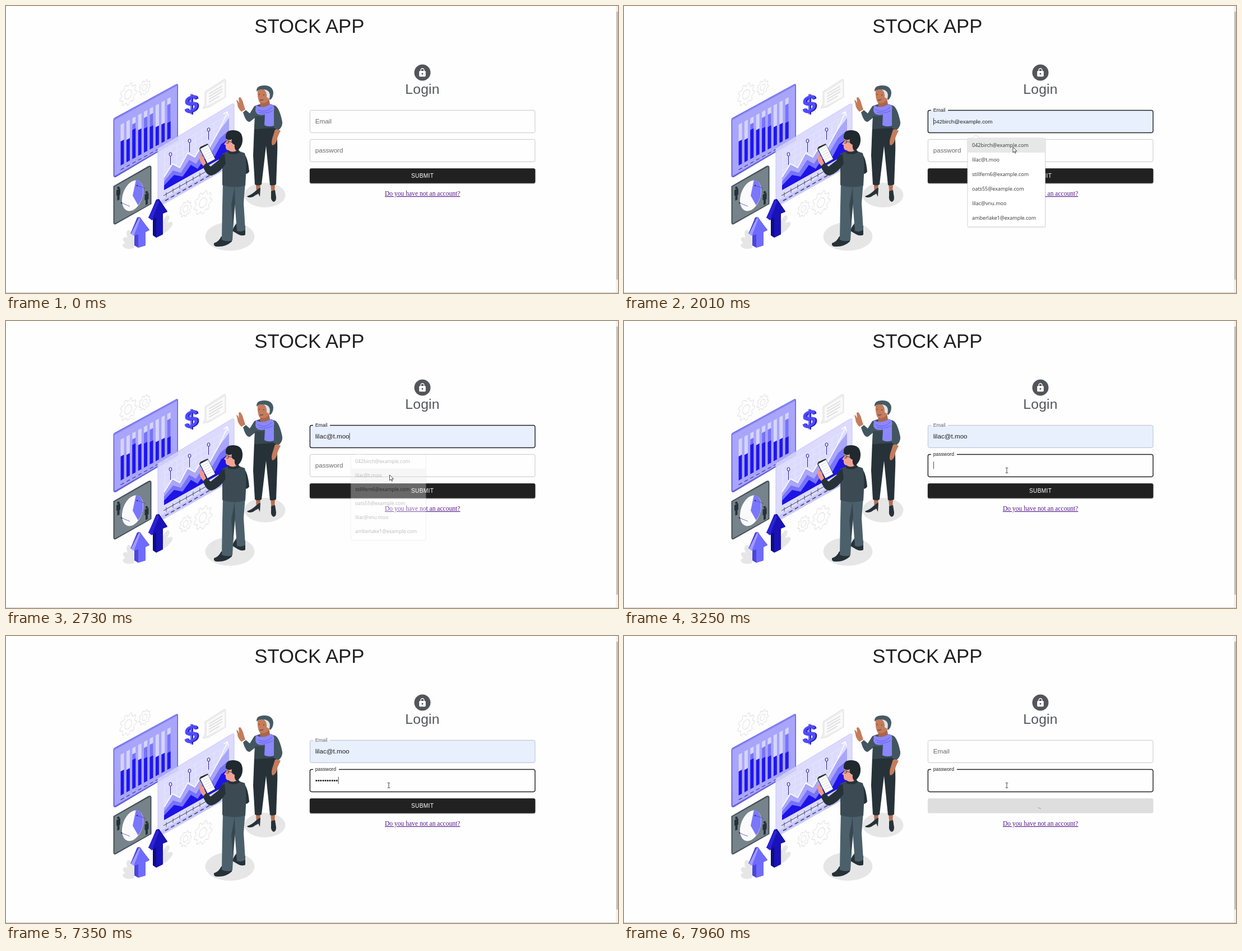
An HTML page for the animation above (8 s loop, 1092 by 513 pixels).

```html
<!DOCTYPE html>
<html lang="en">
<head>
<meta charset="utf-8">
<title>Stock App</title>
<style>
  html, body { margin: 0; height: 100%; overflow: hidden; background: #fefefe; }
  svg { display: block; width: 100vw; height: 100vh; }
  text { font-family: "Liberation Sans", Arial, sans-serif; font-size: 11.64px; fill: #212121; }
  #menu text { font-family: "Open Sans", "Noto Sans", sans-serif; font-size: 9px; fill: #333; }
  .line { fill: none; stroke: #e3e3e3; stroke-width: 1.3; }
</style>
</head>
<body>
<svg viewBox="0 0 1092 513">
  <rect width="1092" height="513" fill="#fefefe"/>
  <rect x="1088" width="4" height="513" fill="#f1f1f1"/>
  <rect x="1089" y="10" width="3" height="479" fill="#c1c1c1"/>
  <path d="M0 512.5H1092" stroke="#d8cabd"/>
  <text x="443.3" y="48" style="font-size:34.7px">STOCK APP</text>

  <g id="scenery">
    <ellipse cx="399.5" cy="412" rx="44" ry="25.5" fill="#e6e6e6"/>
    <ellipse cx="462" cy="338" rx="36.5" ry="22" fill="#e6e6e6"/>
    <g id="gears" class="line"></g>

    <!-- note -->
    <path d="M355 153L389 131Q392 130 392 133V163L362 181L351 183L355 175Z" fill="#ededed" stroke="#e3e3e3"/>
    <path d="M358 155L390 135V162L358 179Z" fill="#fafafa"/>
    <path d="M362 157L386 143M362 162L386 148M362 167L386 153M362 172L381 161" stroke="#dcdcdc" stroke-width="1.5"/>

    <!-- leaves -->
    <path d="M228 433C209 438 203 425 213 424C205 417 209 411 217 414C212 403 218 396 224 404L231 420ZM274 408C278 382 287 370 291 375C294 380 287 386 288 388C300 381 300 392 291 399C287 405 281 405 274 410Z" fill="#e6e6e6"/>

    <!-- bar chart panel -->
    <path d="M191.5 203Q192 200 195 199L303 140Q307 138 307 142V240L196 306Q192 307 191.5 303Z" fill="#6561dc"/>
    <path d="M193 203.5L305.5 142V239L193.500 304Z" fill="#a8a5fb"/>
    <path d="M192 202L304 139.5L305.5 142L193 204Z" fill="#8582f6"/>
    <g id="bars" transform="matrix(1 -.55 0 1 192 202)"></g>

    <!-- area chart panel -->
    <path d="M271 255L402 176Q407 173 407 177V283L274 358Q271 359 271 356Z" fill="#d8d6fd" fill-opacity=".88" stroke="#c5c3fc"/>
    <path d="M271 351L407 273V283L271 358Z" fill="#c6c4fc"/>
    <g id="grid" transform="matrix(1 -.585 0 1 271 254)" stroke="#eae9fe" stroke-width=".7"></g>
    <path d="M282 307L297 283L310 290L324 264L337 271L350 250L362 256L380 224L398 200V264L282 329Z" fill="#aaa7fa"/>
    <path d="M282 314L298 294L312 298L327 275L339 282L352 262L364 266L382 236L398 222V264L282 329Z" fill="#7773fb"/>
    <path d="M282 321L300 302L315 305L330 284L342 291L354 273L368 277L384 247L398 237V264L282 329Z" fill="#1d14e6"/>
    <path d="M282 306L297 282L310 289L324 263L337 270L350 249L362 255L380 223L395 190M388 193L395 189L397 197" fill="none" stroke="#fff" stroke-width="1.5"/>
    <path d="M281 339L399 272" stroke="#353c55"/>
    <path d="M284 348L384 291" stroke="#353c55" stroke-width="1.5" stroke-dasharray="7 5"/>
    <path d="M286 333v8m12-15v8m12-15v8m12-15v8m12-15v8m12-15v8m12-15v8" stroke="#353c55" stroke-width=".8"/>
    <g id="pins" fill="none" stroke="#25209b"></g>

    <!-- dollar -->
    <g transform="matrix(1 -.32 0 1 318 194)" font-weight="700">
      <text x="2.5" y="1.5" style="font-size:44px;fill:#2620bd">$</text>
      <text style="font-size:44px;fill:#504bff">$</text>
    </g>

    <!-- pie panel -->
    <path d="M191.5 322L254 286Q259 284 259.5 288V354L196 390Q192 392 191.5 387Z" fill="#434f57"/>
    <path d="M193.5 323L257.5 287V353.5L193.5 389Z" fill="#76838a"/>
    <g transform="rotate(20 226 339)">
      <ellipse cx="226" cy="339" rx="17.5" ry="28.5" fill="#fafafa"/>
      <path d="M226 339L222 311A17.5 28.5 0 0 1 241 352Z" fill="#7b77fb"/>
    </g>
    <path d="M206 352L221 358M234 321L249 326" stroke="#4b47c8" stroke-width=".8"/>
    <g fill="#263238"><circle cx="206" cy="352" r="1.2"/><circle cx="234" cy="321" r="1.2"/>
      <g id="figure"><circle cx="200.5" cy="325" r="2.3"/><path d="M197 329L204 326V337L202.5 338V346L198.5 348V339L197 339Z"/></g>
      <use href="#figure" x="50.5" y="8"/>
    </g>

    <!-- growth arrows -->
    <path d="M234 378L238 377L256 400L249 404V428L236 432L229 428V407L222 407Z" fill="#4b46d6"/>
    <path d="M239 377L256 401L249 404V428L236 432V408L228 411Z" fill="#6f6bff"/>
    <path d="M238 377L223 407L228 411L239 382Z" fill="#a09dff"/>
    <path d="M268 346L273 345L288 367L280 371V408L268 414L262 410V377L254 379Z" fill="#100b80"/>
    <path d="M272 346L288 368L280 371V408L268 414V378L260 383Z" fill="#1912b8"/>
    <path d="M270 345L254 378L260 383L273 350Z" fill="#2b23d6"/>

    <!-- standing woman -->
    <path d="M446 318H454L453 333L447 338ZM472 318H480L479 336L474 338Z" fill="#b56f53"/>
    <path d="M451 326L454 325L453 341L450 335L441 341Q432 344 430 340Q439 337 446 330ZM473 331L480 329L482 342Q482 350 477 350Q472 347 473 339Z" fill="#263238"/>
    <path d="M443 216L482 214Q485 242 484 264L482 319Q476 322 471 320L464 250L456 319Q450 322 444 319L441 267Z" fill="#263238"/>
    <path d="M443 179Q460 171 480 178Q488 182 493 207Q494 216 486 222L478 218V217L443 220L444 200L435 207Q428 208 423 190L428 186L435 192Z" fill="#435660"/>
    <path d="M444 197L443 220L478 218V197Z" fill="#37474f"/>
    <path d="M420 189Q413 182 413 175L411 168Q414 168 416 174L415 164L418 163Q422 167 424 176L427 185ZM486 221L490 223Q484 234 483 241Q480 249 475 249Q473 244 475 237L480 221Z" fill="#c47c5c"/>
    <path d="M453 165H469L472 181L454 184Z" fill="#a8664c"/>
    <path d="M446 177Q457 185 473 175Q480 177 478 187V214Q468 217 461 213L462 194Q447 197 445 187Z" fill="#8a87ff"/>
    <path d="M449 185Q462 193 475 181M451 190Q464 194 476 187" fill="none" stroke="#625eea"/>
    <path d="M449 151Q456 145 466 149L471 160L469 168Q461 177 452 172Q448 163 449 151Z" fill="#c47c5c"/>
    <path d="M447 153Q446 142 461 142Q475 142 477 154Q477 164 471 168L467 162Q468 154 462 150Q452 147 447 153Z" fill="#455a64"/>
    <path d="M460 149Q474 151 470 166L465 163Q466 154 460 149Z" fill="#dfe3e5"/>
    <path d="M452 157v2m8-1v2m-7 8q4 1 6-1" fill="none" stroke="#263238"/>

    <!-- man with tablet -->
    <path d="M384 412L403 410V421Q392 431 377 430Q370 430 371 424Q380 421 384 412ZM411 389L427 393V409Q421 412 414 408L404 402Q405 396 411 389Z" fill="#263238"/>
    <path d="M387 315H427L424 352L427 400Q421 405 412 402L408 350L404 419Q394 422 385 418L386 357Z" fill="#4b606a"/>
    <path d="M408 323L409 352L405 394L402 355Z" fill="#37474f"/>
    <path d="M423 264Q431 266 434 296Q430 302 424 299Z" fill="#263238"/>
    <path d="M386 264Q405 254 426 263Q430 276 427 321Q407 327 386 320Z" fill="#3c4b53"/>
    <path d="M390 264Q383 267 379 276L365 287L356 278L351 286Q358 304 367 303Q382 298 392 282Z" fill="#263238"/>
    <path d="M345 256Q345 253 348 251L360 246L374 274L360 282Z" fill="#263238"/>
    <path d="M346.5 255.500L360.5 248L373 273.5L359.500 281Z" fill="#fff"/>
    <path d="M351 258L361 253M353 262L363 257M355 266L365 261M357 270L367 265M359 274L369 269" stroke="#c9c9d0" stroke-width=".8"/>
    <path d="M344 263L352 270L357 281L352 286Q345 280 344 263Z" fill="#ee9a8b"/>
    <path d="M394 235L409 233L412 259Q403 266 398 258Q391 258 392 249L389 247L393 242Z" fill="#f0a394"/>
    <path d="M392 236Q391 222 405 222Q421 222 422 237Q423 251 412 259Q407 257 408 248Q401 246 403 238Q396 242 392 236Z" fill="#1f292e"/>
    <path d="M397 258Q406 264 414 256L418 261Q408 268 396 263Z" fill="#263238"/>
    <path d="M392 241h5v4h-4m4-3l8 2" fill="none" stroke="#263238" stroke-width=".9"/>
  </g>

  <circle cx="743" cy="119" r="14.5" fill="#52565b"/>
  <path transform="translate(734.3 110.3) scale(.727)" fill="#fff" fill-rule="evenodd" d="M18 8h-1V6c0-2.76-2.24-5-5-5S7 3.24 7 6v2H6c-1.1 0-2 .9-2 2v10c0 1.1.9 2 2 2h12c1.1 0 2-.9 2-2V10c0-1.1-.9-2-2-2zm-6 9a2 2 0 1 1 0-4 2 2 0 0 1 0 4zm3.1-9H8.9V6a3.1 3.1 0 0 1 6.2 0z"/>
  <text x="743" y="157" text-anchor="middle" style="font-size:24.7px;letter-spacing:.18px;fill:#52565b">Login</text>

  <g id="email"><rect/><path fill="none"/><text class="value" x="551.7"></text><text class="label">Email</text></g>
  <g id="password"><rect/><path fill="none"/><text class="value" x="551.7"></text><text class="label">password</text></g>
  <rect id="caret" width=".8" height="13" fill="#222"/>

  <g id="shadow"><rect x="542" y="291.5" width="402.3" height="27" rx="3" fill="#000" opacity=".13"/><rect x="541.5" y="290.5" width="403.3" height="27.3" rx="3" fill="#000" opacity=".16"/></g>
  <rect id="button" x="541.9" y="290.2" width="402.5" height="26.5" rx="3"/>
  <text id="submit" x="743.1" y="306.5" text-anchor="middle" style="font-size:10.2px;font-weight:500;letter-spacing:.29px;fill:#fff">SUBMIT</text>
  <path id="spinner" d="M738.8 306.3q1.6 2.5 5 1.5" fill="none" stroke="#a6a6a6" stroke-width="1.2"/>
  <text x="676" y="339" text-decoration="underline" style="font-family:'Liberation Serif',Times,serif;font-size:11.55px;fill:#551a8b">Do you have not an account?</text>

  <g id="menu">
    <rect x="612" y="236" width="141" height="161" rx="4" fill="#000" opacity=".06"/>
    <path d="M616 236H622L628 230.5L634 236H748.5a3 3 0 0 1 3 3V391.5a3 3 0 0 1-3 3H616a3 3 0 0 1-3-3V239a3 3 0 0 1 3-3Z" fill="#fff" stroke="#d4d4d4" stroke-width=".8"/>
    <rect id="highlight" x="613" width="138.5" height="26" fill="#e6e7e7"/>
  </g>
  <path id="arrow" d="M0 0V10L2.3 7.9L3.8 11.3L5.3 10.6L3.9 7.4H7Z" fill="#fff" stroke="#222" stroke-width=".8"/>
  <path id="beam" d="M-2.2 -4.5H-.6L0 -4L.6 -4.5H2.2M0 -4V4M-2.2 4.5H-.6L0 4L.6 4.5H2.2" fill="none" stroke="#333" stroke-width=".9"/>
</svg>
<script>
const LOOP = 8000, INK = '#212121';
const $ = id => document.getElementById(id);
const set = (el, attrs) => { for (const k in attrs) el.setAttribute(k, attrs[k]); };
const add = (parent, tag, attrs, text = '') => {
  const el = document.createElementNS('http://www.w3.org/2000/svg', tag);
  set(el, attrs);
  el.textContent = text;
  parent.append(el);
  return el;
};
const ramp = (t, from, to) => Math.min(1, Math.max(0, (t - from) / (to - from)));
const ease = p => 1 - (1 - p) ** 3;
const show = (el, on) => { el.style.display = on ? '' : 'none'; };

function drawGear(x, y, r) {
  const points = [];
  for (let i = 0; i < 36; i++) {
    const radius = i % 4 < 2 ? r : r * .78, a = (i + .5) * Math.PI / 18;
    points.push([radius * Math.cos(a), radius * Math.sin(a)].map(v => v.toFixed(1)));
  }
  const gear = add($('gears'), 'g', { transform: `matrix(.8 -.4 0 1 ${x} ${y})` });
  add(gear, 'polygon', { points: points.join(' '), 'stroke-linejoin': 'round' });
  add(gear, 'circle', { r: r * .42 });
}
[[218, 158, 19], [247.5, 145.5, 13], [320.5, 362.5, 13.5], [351.5, 351.5, 20]].forEach(g => drawGear(...g));

[47, 50, 38, 44, 47, 50, 56, 57, 60].forEach((top, i) => {
  const bar = (y, fill) => add($('bars'), 'rect', { x: 12.5 + i * 10.4, y, width: 6, height: 90 - y, fill });
  bar(17, '#d5d4fd');
  if (i % 3 == 2 || i == 4) bar(28, '#7773fb');
  bar(top, '#1e16f2');
  add($('bars'), 'rect', { x: 12.5 + i * 10.4, y: 97, width: 6, height: 1.3, fill: '#393594' });
});
for (let i = 0; i < 11; i++) add($('grid'), 'path', { d: `M${12 + i * 11} 14V82` });
for (let i = 0; i < 7; i++) add($('grid'), 'path', { d: `M12 ${14 + i * 11}H125` });
[[293.5, 265, 284], [327.5, 241, 261], [361.5, 221, 239]].forEach(([x, y, end]) => {
  add($('pins'), 'ellipse', { cx: x, cy: y, rx: 2.4, ry: 3.2 });
  add($('pins'), 'path', { d: `M${x} ${y + 3}V${end}` });
});

const accounts = ['042birch@example.com', 'lilac@t.moo', 'stillfern6@example.com',
  'oats55@example.com', 'lilac@vnu.moo', 'amberlake1@example.com'];
accounts.forEach((name, i) => add($('menu'), 'text', { x: 621, y: 252 + i * 25.95 }, name));

// [time, x, y, shape]; the pointer jumps from place to place
const pointer = [
  [250, 960, 441, 'arrow'], [330, 880, 398, 'arrow'], [400, 801, 353, 'arrow'],
  [590, 790, 343, 'arrow'], [660, 766, 322, 'arrow'], [730, 742, 298, 'arrow'],
  [790, 722, 272, 'beam'], [860, 708, 258, 'beam'], [930, 704, 250, 'beam'],
  [1200, 703, 234, 'beam'], [1280, 703, 225, 'beam'], [1760, 701, 232, 'arrow'],
  [1830, 698, 244, 'arrow'], [1940, 694, 252, 'arrow'], [2270, 688, 264, 'arrow'],
  [2400, 685, 272, 'arrow'], [2470, 684.5, 275, 'arrow'], [2930, 683, 267, 'beam']
];
const keyTimes = [4300, 4630, 4960, 5240, 5700, 6170, 6490, 6760, 7090, 7350];

function drawField(id, y, { float, focus, hover, fill = 'none', value = '', size = 11.64, notch }) {
  const [box, border, text, label] = $(id).children;
  const gap = 548 + notch * float, top = y + .4;
  set(box, { x: 542.4, y: top, width: 401.6, height: 40, rx: 3, fill });
  set(border, {
    d: `M${gap} ${top}H941a3 3 0 0 1 3 3v34a3 3 0 0 1-3 3H545.4a3 3 0 0 1-3-3v-34a3 3 0 0 1 3-3H548`,
    stroke: focus || hover ? INK : fill == 'none' ? '#bbb' : '#acb2be', 'stroke-width': focus ? 1.45 : .8
  });
  text.textContent = value;
  text.style.fontSize = size + 'px';
  set(text, { y: y + 23.8 });
  label.style.fill = focus ? INK : '#6a6a6a';
  set(label, { transform: `translate(551.7 ${y + 24 - 20.8 * float}) scale(${1 - .25 * float})` });
}

function render(t) {
  const cleared = t >= 7820, emailFocus = t >= 1400 && t < 3000, passwordFocus = t >= 3000;
  const row = t < 2010 ? -1 : t < 2270 ? 0 : 1;
  const typed = cleared ? 0 : keyTimes.filter(k => t >= k).length;
  const committed = t >= 2670;

  drawField('email', 186, {
    float: ease(ramp(t, 1400, 1600)) * (1 - ease(ramp(t, 7820, 7960))),
    focus: emailFocus, hover: t >= 1200 && t < 1400, notch: 30,
    fill: row >= 0 && !cleared ? '#e8f0fe' : 'none',
    value: row >= 0 && !cleared ? accounts[row] : '',
    size: committed ? 11.64 : 9.8
  });
  drawField('password', 238, {
    float: ease(ramp(t, 3000, 3200)), focus: passwordFocus, hover: t >= 790 && t < 1200 || t >= 2930,
    notch: 46, value: '•'.repeat(typed)
  });

  const caretOn = emailFocus || t >= 3000 && t < 3640 || t >= 4170 && t < 7820;
  show($('caret'), caretOn);
  set($('caret'), emailFocus
    ? { x: committed ? 612.6 : 552, y: 200 }
    : { x: 552 + typed * 4.07, y: 251.5 });

  const leaving = ramp(t, 2670, 2760), scale = 1 - .05 * leaving;
  show($('menu'), t >= 1620 && leaving < 1);
  set($('menu'), {
    opacity: ramp(t, 1600, 1760) * (1 - leaving),
    transform: `translate(682 315) scale(${scale}) translate(-682 -315)`
  });
  show($('highlight'), t >= 1940);
  set($('highlight'), { y: row == 1 ? 262 : 236 });

  const loading = ramp(t, 7750, 7940), grey = 33 + 189 * loading;
  set($('button'), { fill: `rgb(${grey},${grey},${grey})` });
  set($('shadow'), { opacity: 1 - loading });
  show($('submit'), t < 7750);
  show($('spinner'), t >= 7820);

  const place = pointer.findLast(p => t >= p[0]);
  for (const shape of ['arrow', 'beam']) {
    show($(shape), place && place[3] == shape);
    if (place) set($(shape), { transform: `translate(${place[1]} ${place[2]})` });
  }
}

function frame() {
  render(performance.now() % LOOP);
  requestAnimationFrame(frame);
}
frame();
</script>
</body>
</html>
```
